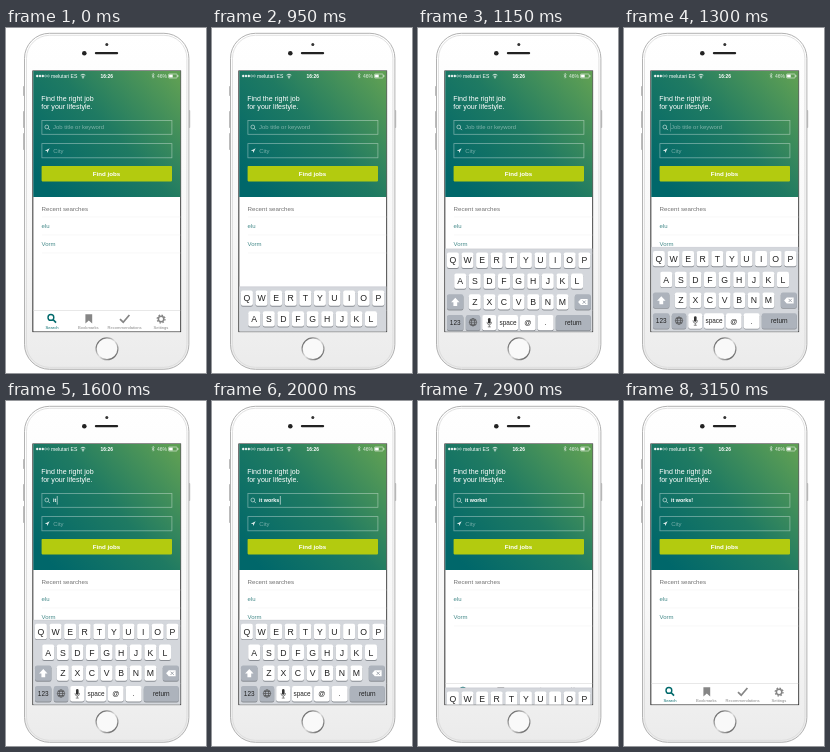
An HTML page for the animation above (3650 ms loop, 200 by 345 pixels).

```html
<!DOCTYPE html>
<html lang="en">
<head>
<meta charset="utf-8">
<title>Job search</title>
<style>
html, body { margin: 0; width: 100%; height: 100%; overflow: hidden; background: #fff; }
svg { display: block; width: 100%; height: 100%; font-family: "Liberation Sans", Arial, sans-serif; }
.mid { text-anchor: middle; }
</style>
</head>
<body>
<svg viewBox="0 0 200 345">
  <defs>
    <linearGradient id="sky" gradientUnits="userSpaceOnUse" x1="42" y1="160" x2="168" y2="46">
      <stop offset="0" stop-color="#00676a"/>
      <stop offset=".5" stop-color="#1f7a62"/>
      <stop offset="1" stop-color="#5e9f54"/>
    </linearGradient>
    <linearGradient id="shell" x1="0" y1="0" x2="0" y2="1">
      <stop offset="0" stop-color="#fff"/>
      <stop offset=".6" stop-color="#f8f8f8"/>
      <stop offset="1" stop-color="#ebebeb"/>
    </linearGradient>
    <linearGradient id="ring" x1="0" y1="0" x2="1" y2="1">
      <stop offset=".1" stop-color="#606060"/>
      <stop offset=".5" stop-color="#e0e0e0"/>
      <stop offset=".9" stop-color="#606060"/>
    </linearGradient>
    <clipPath id="screen"><rect x="27.3" y="43" width="147" height="260.4"/></clipPath>
  </defs>

  <!-- phone -->
  <g fill="#bbb">
    <rect x="17" y="58" width="2" height="10" rx=".8"/>
    <rect x="17" y="83" width="2" height="17" rx=".8"/>
    <rect x="17" y="105" width="2" height="17" rx=".8"/>
    <rect x="182.2" y="82" width="2" height="18" rx=".8"/>
  </g>
  <rect x="18.5" y="5.3" width="164.4" height="336" rx="25" fill="url(#shell)" stroke="#b2b2b2" stroke-width="1"/>
  <rect x="20.5" y="7.3" width="160.4" height="332" rx="23" fill="none" stroke="#dadada" stroke-width=".8"/>
  <circle cx="100.8" cy="16.5" r="1.5" fill="#333"/>
  <circle cx="78.3" cy="25.2" r="2.3" fill="#222"/>
  <rect x="88.8" y="23.9" width="23.4" height="2.4" rx="1.2" fill="#222"/>
  <circle cx="101" cy="320.8" r="10.9" fill="#f9f9f9" stroke="url(#ring)" stroke-width="1.2"/>
  <rect x="26.4" y="42.5" width="148.7" height="261.6" fill="#1c1c1c"/>

  <g clip-path="url(#screen)">
    <rect x="27" y="43" width="148" height="261" fill="#fff"/>
    <rect x="27" y="43" width="148" height="126" fill="url(#sky)"/>

    <!-- status bar -->
    <g fill="#fff" font-size="5.1">
      <g id="signal" stroke="#fff" stroke-width=".4"></g>
      <text x="45" y="49.9">melutari ES</text>
      <g fill="none" stroke="#fff" stroke-width=".8">
        <path d="M74.7 47.2Q77 45.2 79.3 47.2M75.7 48.6Q77 47.5 78.3 48.6"/>
        <path d="M146 46.3L148.2 49.1L147.1 50.2V45.2L148.2 46.3L146 49.1" stroke-width=".4"/>
        <rect x="162.5" y="46" width="8.6" height="4" rx=".7" stroke-width=".5"/>
      </g>
      <circle cx="77" cy="49.8" r=".7"/>
      <text class="mid" x="100.7" y="49.8" font-size="4.9" font-weight="bold">16:26</text>
      <text x="151" y="49.8" font-size="5" fill-opacity=".85">46%</text>
      <rect x="163.1" y="46.6" width="3.6" height="2.8"/>
      <rect x="171.5" y="47.2" width=".8" height="1.6"/>
    </g>

    <!-- search form -->
    <g fill="#fff" font-size="7.05">
      <text x="35.2" y="72.6">Find the right job</text>
      <text x="35.2" y="81">for your lifestyle.</text>
    </g>
    <g fill="none" stroke="#fff" stroke-opacity=".42" stroke-width=".8">
      <rect x="35.9" y="92.5" width="130" height="13.8"/>
      <rect x="35.9" y="115.6" width="130" height="14.2"/>
    </g>
    <path d="M42.2 100.4L43.9 102.1" stroke="#fff" stroke-opacity=".85" stroke-width=".7"/>
    <circle cx="40.8" cy="99" r="1.9" fill="none" stroke="#fff" stroke-opacity=".85" stroke-width=".6"/>
    <path d="M38.8 122.8L43.6 120.2L41.3 125.1L40.9 123.1Z" fill="#fff" fill-opacity=".85"/>
    <g fill="#fff" fill-opacity=".45" font-size="5.95">
      <text id="hint" x="47" y="101.4">Job title or keyword</text>
      <text x="47.3" y="124.8">City</text>
    </g>
    <text id="query" x="47" y="101.3" font-size="5.4" font-weight="bold" fill="#fff" xml:space="preserve"></text>
    <rect id="caret" y="95" width=".8" height="8.6" fill="#fff" fill-opacity=".7"/>
    <rect x="35.6" y="138" width="130.4" height="15.4" rx=".8" fill="#b3cb0f"/>
    <text class="mid" x="100.5" y="148" font-size="6.2" font-weight="bold" fill="#fff">Find jobs</text>

    <!-- recent searches -->
    <text x="35.6" y="182.8" font-size="6.2" fill="#707070">Recent searches</text>
    <path d="M36 189H175M36 207H175M36 225H175" stroke="#f4f4f4" stroke-width=".6"/>
    <g fill="#458a8a" font-size="6">
      <text x="35.6" y="200.2">elu</text>
      <text x="35.6" y="218.2">Vorm</text>
    </g>

    <!-- tab bar -->
    <path d="M27 282.5H175" stroke="#d8d8d8" stroke-width=".6"/>
    <g fill="none" stroke="#00696b" stroke-width="1.4">
      <circle cx="44.9" cy="289.4" r="2.9"/>
      <path d="M47 291.5L50 294.6" stroke-width="1.7"/>
    </g>
    <path d="M79.4 286.2H86.2V295.4L82.8 292.6L79.4 295.4Z" fill="#868686"/>
    <path d="M114 291.2L117.2 294.2L123.4 287" fill="none" stroke="#868686" stroke-width="1.7"/>
    <g fill="none" stroke="#868686">
      <circle cx="155.1" cy="291" r="2.7" stroke-width="1.5"/>
      <circle cx="155.1" cy="291" r="3.9" stroke-width="1.3" stroke-dasharray="1.53 1.53"/>
    </g>
    <g id="tabs" class="mid" font-size="4.1"></g>

    <g id="keyboard">
      <rect x="27" y="219" width="148" height="86" fill="#d4d7dc"/>
      <path d="M27 219.2H175" stroke="#c4c7cc" stroke-width=".5"/>
      <g id="keys" class="mid" fill="#222"></g>
      <path d="M37.3 268L41.5 272.5H39.2V276.2H35.4V272.5H33.1Z" fill="#fff"/>
      <path d="M160.1 272.3L162.8 269.3H169.6V275.3H162.8Z" fill="#fff"/>
      <path d="M164.6 270.7L167.8 273.9M167.8 270.7L164.6 273.9" stroke="#8d949e" stroke-width=".8"/>
      <g fill="none" stroke="#444" stroke-width=".6">
        <circle cx="55" cy="292.5" r="3.7"/>
        <ellipse cx="55" cy="292.5" rx="1.7" ry="3.7"/>
        <path d="M51.3 292.5H58.7M52 290.5H58M52 294.5H58"/>
        <path d="M69 292.1Q69 295 71.3 295T73.6 292.1M71.3 295V297.1M69.8 297.1H72.8"/>
      </g>
      <rect x="70" y="288.1" width="2.6" height="5.6" rx="1.3" fill="#333"/>
    </g>
  </g>
</svg>
<script>
const LOOP = 3650, TICK = 50, DROP = 86, RATE = 0.0155;
const $ = id => document.getElementById(id);

function add(parent, tag, attrs, text) {
  const el = document.createElementNS("http://www.w3.org/2000/svg", tag);
  for (const k in attrs) el.setAttribute(k, attrs[k]);
  if (text) el.textContent = text;
  parent.appendChild(el);
  return el;
}

function key(x, y, w, label = "", size = 8.7, fill = "#fff") {
  const box = { x, width: w, height: 15.4, rx: 2 };
  add($("keys"), "rect", { ...box, y: y + 0.9, fill: "#8b8f95" });
  add($("keys"), "rect", { ...box, y, fill });
  add($("keys"), "text", { x: x + w / 2, y: y + 7.8 + size * 0.36, "font-size": size }, label);
}

function letters(row, x, y) {
  [...row].forEach((c, i) => key(x + i * 14.6, y, 12, c));
}

const GREY = "#adb3bc";
letters("QWERTYUIOP", 28.9, 222.8);
letters("ASDFGHJKL", 36.2, 243.6);
letters("ZXCVBNM", 50.8, 264.4);
key(29, 264.4, 16.4, "", 6, GREY);
key(156.8, 264.4, 16, "", 6, GREY);
key(29, 285.1, 16.4, "123", 6.4, GREY);
key(47.8, 285.1, 14.4, "", 6, GREY);
key(64.2, 285.1, 14);
key(80, 285.1, 20, "space", 6.4);
key(102, 285.1, 15.6, "@", 7);
key(119.6, 285.1, 16, ".", 7);
key(137.8, 285.1, 35, "return", 6.4, GREY);

for (let i = 0; i < 5; i++)
  add($("signal"), "circle", { cx: 31.2 + i * 2.8, cy: 48, r: 1, "fill-opacity": i < 3 ? 1 : 0 });

["Search", "Bookmarks", "Recommendations", "Settings"].forEach((s, i) =>
  add($("tabs"), "text", { x: 46 + i * 36.3, y: 301, fill: i ? "#868686" : "#00696b" }, s));

// [time, characters typed]
const TYPING = [[1500, 1], [1600, 2], [1700, 4], [1800, 5], [1850, 6], [1900, 7], [2000, 8], [2250, 9]];
const PHRASE = "it works!";

function keyboardDrop(t) {
  if (t < 950) return DROP;
  if (t < 1500) return DROP * Math.exp(-RATE * (t - 900));
  if (t < 2850) return 0;
  if (t < 3150) return DROP * (1 - Math.exp(-RATE * (t - 2800)));
  return DROP;
}

function render(t) {
  t = Math.floor(t / TICK) * TICK;
  let typed = 0;
  for (const [at, n] of TYPING) if (t >= at) typed = n;

  $("keyboard").setAttribute("transform", `translate(0 ${keyboardDrop(t).toFixed(2)})`);
  $("hint").setAttribute("visibility", typed ? "hidden" : "visible");
  const query = $("query");
  const text = PHRASE.slice(0, typed);
  if (query.textContent !== text) query.textContent = text;

  const fade = Math.min(1, Math.max(0, (t - 1200) / 250));
  const caret = $("caret");
  caret.setAttribute("x", typed ? 47.5 + query.getComputedTextLength() : 46);
  caret.setAttribute("opacity", t < 2600 ? fade : 0);
}

const start = performance.now();
function loop() {
  render((performance.now() - start) % LOOP);
  requestAnimationFrame(loop);
}
loop();
</script>
</body>
</html>
```
